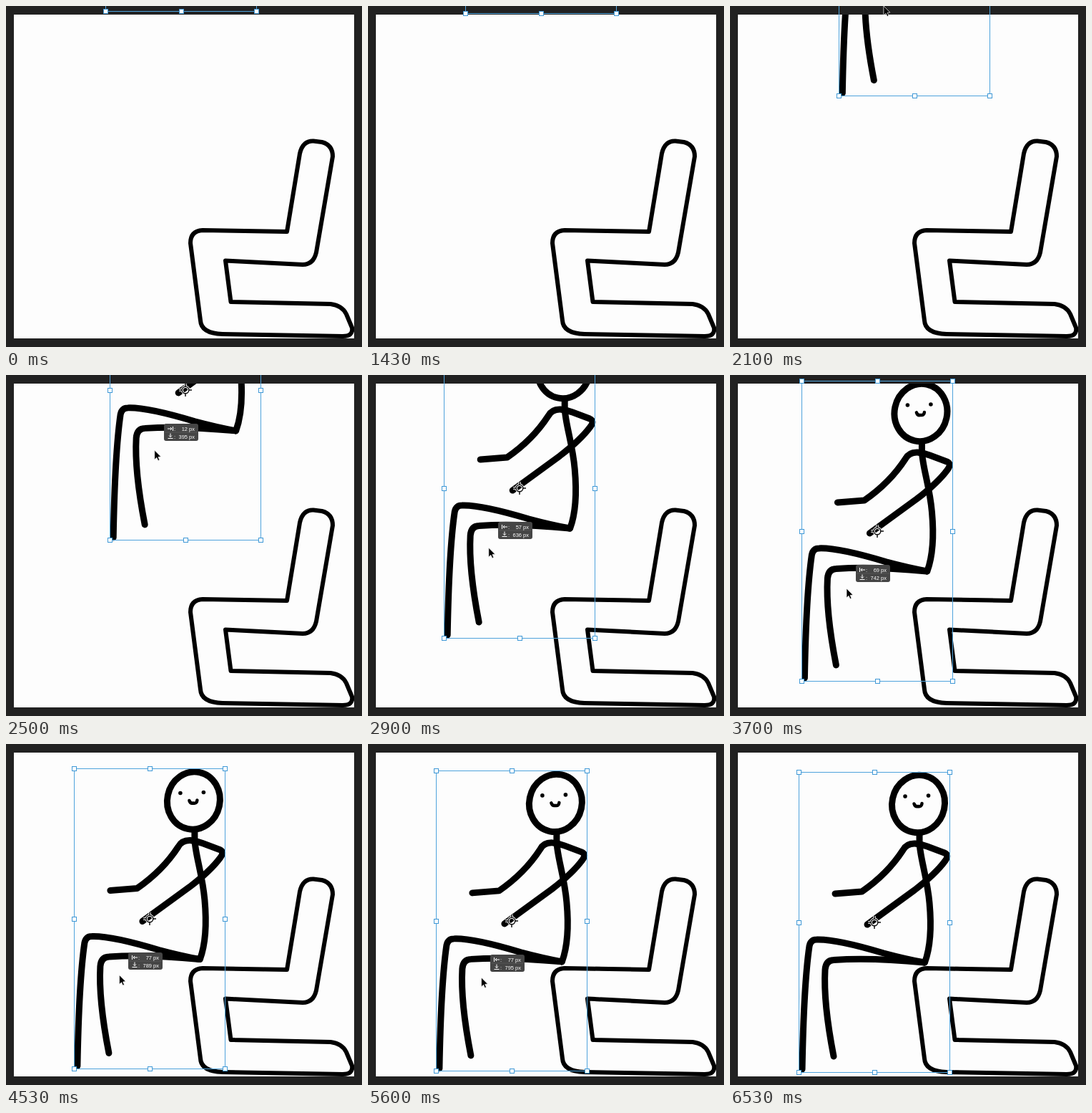
An HTML page that plays this animation: 498 px wide and 476 px high, repeating every 8 s.

```html
<!DOCTYPE html>
<html lang="en">
<head>
<meta charset="utf-8">
<title>Sitting down</title>
<style>
html, body { margin: 0; width: 100%; height: 100%; overflow: hidden; background: #212121; }
svg { display: block; width: 498px; height: 476px; }
.ink { fill: none; stroke: #000; stroke-width: 9; stroke-linecap: round; stroke-linejoin: round; }
.frame { fill: none; stroke: #4fa3dc; }
.handle { fill: #fff; stroke: #3f98d6; }
.halo { fill: none; stroke: #fff; stroke-width: 3.4; }
.ring { fill: none; stroke: #111; stroke-width: 1.5; }
.tip { font: 7.5px "Liberation Sans", Arial, sans-serif; fill: #fff; }
.icon { fill: none; stroke: #fff; stroke-width: 1; }
</style>
</head>
<body>
<svg viewBox="0 0 498 476">
  <defs>
    <clipPath id="page"><rect x="11" y="12" width="476" height="452"/></clipPath>
    <g id="cross"><circle r="4.8"/><path d="M0-9V-5M0 5V9M-9 0H-5M5 0H9"/></g>
  </defs>
  <rect width="498" height="476" fill="#212121"/>
  <rect x="11" y="12" width="476" height="452" fill="#fdfdfd"/>
  <g clip-path="url(#page)">
    <path class="ink" style="stroke-width:6" d="M393 315L411 206Q415 188 430 188.500L442 190Q457 194 457 210L434 344Q430 361 415 361L307 355.500L314.500 413L454 416Q470 418 476 430L484 449Q486 461 471 461L303 458Q273 457 272 439L258 331Q258 314 275 313Z"/>
    <g id="person">
      <g class="ink">
        <ellipse cx="263.500" cy="83.500" rx="36.800" ry="40.300" transform="rotate(12 263.500 83.500)"/>
        <path d="M265 126V138C266 160 276 187 279 222C282 255 281 282 272.500 305"/>
        <path d="M147 209L184.500 206C212 187 229 168 242 148Q247 138.500 259 139Q268 140 276 143L300 152Q307 155 301 163C290 178 275 191 258 204L192 252"/>
        <path d="M101 454C102 400 104 330 111 282Q113 273 121 273C145 272 185 283 215 292Q245 300 272 305"/>
        <path d="M272 305C230 301 180 299 145 301.500Q134 302 133 315C131 350 137 395 145 436"/>
        <path style="stroke-width:4.500" d="M257.500 83.500Q259 88 263 87Q268 88 268.500 83"/>
      </g>
      <circle cx="245" cy="73" r="2.800"/>
      <circle cx="277.500" cy="72" r="2.800"/>
    </g>
  </g>
  <g id="box"><rect class="frame" width="211" height="419"/></g>
  <g id="tip" class="tip">
    <rect width="48" height="24" rx="3" fill="#454545"/>
    <path d="M1 12H47" stroke="#5c5c5c" stroke-width=".7"/>
    <path id="side" class="icon"/>
    <path class="icon" d="M9 13.500V18.500M7 16.500L9 18.500L11 16.500M5.500 20.500H12.500"/>
    <text x="14" y="10">:</text><text x="14" y="20.500">:</text>
    <text id="dx" x="43" y="10" text-anchor="end"></text>
    <text id="dy" x="43" y="20.500" text-anchor="end"></text>
  </g>
  <path id="cursor" d="M0 0V13L3 10.200L5 14.500L7 13.600L5.200 9.400L9 9Z" stroke="#fff" stroke-width=".7"/>
</svg>
<script>
const LOOP = 8000, ZOOM = 0.565, WIDE = 211, TALL = 419;
const HOME = { x: 139, y: 7.8 };
const REST = { x: 96.6, y: 458.1 };

// time, drag offset in document px
const drag = [
  [0, 0, 0], [1400, 0, 0], [1430, -4, 5], [1800, 10, 95], [2230, 31, 258],
  [2300, 29, 292], [2500, 12, 395], [2900, -57, 636], [3130, -64, 690],
  [3700, -69, 742], [3930, -72, 760], [4530, -77, 789], [4730, -78, 793],
  [5000, -78, 793], [5030, -77, 795], [5600, -77, 795], [5700, -75, 797], [LOOP, -75, 797]
];
// time, pointer offset from the lower left corner of the box
const grip = [[0, 62, -125], [2900, 62, -126], [3700, 63, -129], [4530, 63, -131], [LOOP, 63, -131]];
// time, pointer's way out
const leave = [[0, 0, 0], [6000, 0, 0], [6500, 350, 155], [LOOP, 350, 155]];

const $ = id => document.getElementById(id);
const crisp = v => Math.floor(v) + 0.5;
const move = (id, x, y) => $(id).setAttribute("transform", `translate(${x} ${y})`);
const show = (id, on) => $(id).setAttribute("visibility", on ? "visible" : "hidden");

function add(tag, attrs) {
  const el = document.createElementNS("http://www.w3.org/2000/svg", tag);
  for (const k in attrs) el.setAttribute(k, attrs[k]);
  $("box").append(el);
}

for (const type of ["halo", "ring"])
  add("use", { href: "#cross", class: type, x: WIDE / 2, y: TALL / 2 });
for (const u of [0, 0.5, 1])
  for (const v of [0, 0.5, 1])
    if (u !== 0.5 || v !== 0.5)
      add("rect", { class: "handle", x: Math.round(u * WIDE) - 3, y: Math.round(v * TALL) - 3, width: 6, height: 6 });

function at(steps, t) {
  const i = steps.findIndex(s => s[0] > t);
  const [t0, x0, y0] = steps[i - 1], [t1, x1, y1] = steps[i];
  const k = (t - t0) / (t1 - t0);
  return [x0 + (x1 - x0) * k, y0 + (y1 - y0) * k];
}

function draw(now) {
  const ms = now % LOOP;
  const t = Math.floor(ms / 100) * 100 + (ms % 100 >= 30 ? 30 : 0);
  const [dx, dy] = at(drag, t);
  const x = HOME.x + dx * ZOOM, y = HOME.y + dy * ZOOM;
  const [gx, gy] = at(grip, t), [lx, ly] = at(leave, t);

  move("person", x - REST.x, y - REST.y);
  move("box", crisp(x), crisp(y) - TALL);
  move("tip", Math.round(x + 75.5), Math.round(y - 162.5));
  move("cursor", x + gx + lx, y + gy + ly);
  show("tip", t >= 1430 && t < 5630);
  show("cursor", t < 6500);
  $("side").setAttribute("d", dx < 0
    ? "M5.500 4V10M13 7H7M9 5L7 7L9 9"
    : "M12.500 4V10M5 7H11M9 5L11 7L9 9");
  $("dx").textContent = Math.abs(Math.round(dx)) + " px";
  $("dy").textContent = Math.round(dy) + " px";
}

const start = performance.now();
function tick() {
  draw(performance.now() - start);
  requestAnimationFrame(tick);
}
tick();
</script>
</body>
</html>
```
